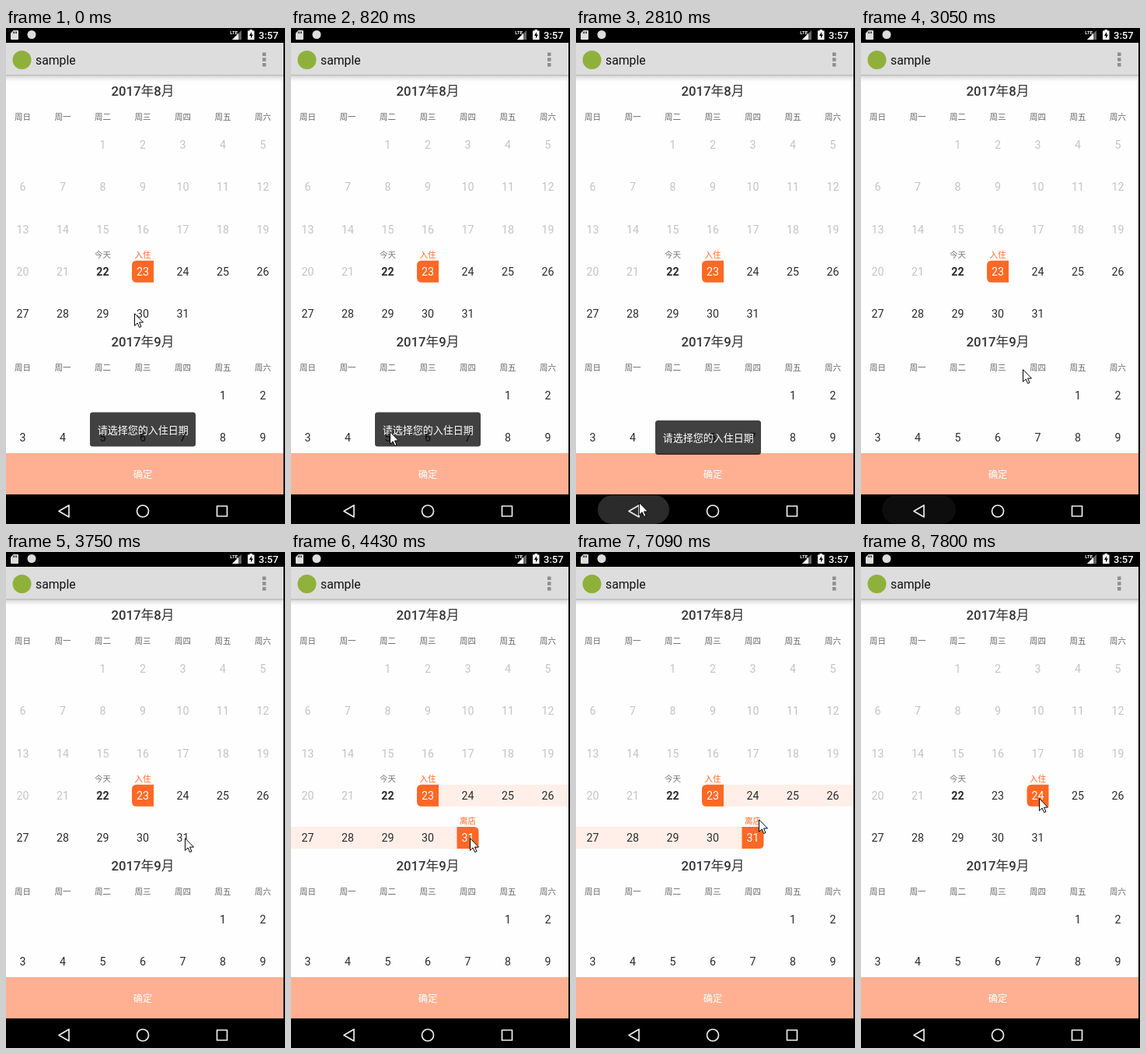
Write an HTML page that moves like this. It is 359 by 637 pixels and loops after 8000 ms.

```html
<!DOCTYPE html>
<html lang="zh-CN">
<head>
<meta charset="utf-8">
<title>sample</title>
<style>
  html, body { margin: 0; width: 100%; height: 100%; overflow: hidden; background: #000; }
  svg { display: block; width: 359px; height: 637px; }
  text { font-family: Roboto, "Noto Sans CJK SC", "Noto Sans CJK", sans-serif; }
</style>
</head>
<body>
<svg id="stage" viewBox="0 0 359 637" xmlns="http://www.w3.org/2000/svg">
  <defs>
    <linearGradient id="shade" x1="0" y1="0" x2="0" y2="1">
      <stop offset="0" stop-color="#b4b4b4"/>
      <stop offset=".3" stop-color="#e2e2e2"/>
      <stop offset="1" stop-color="#fff"/>
    </linearGradient>
  </defs>
  <rect width="359" height="637"/>
  <rect y="19" width="357" height="580" fill="#fefefe"/>
  <g id="marks"></g>
  <g id="calendar"></g>

  <!-- action bar -->
  <rect y="60" width="357" height="9" fill="url(#shade)"/>
  <rect y="19" width="357" height="41" fill="#ddd"/>
  <circle cx="20.5" cy="41" r="12" fill="#8fb13c"/>
  <text x="38" y="47" font-size="15.8" fill="#111">sample</text>
  <path d="M330 31.5h4.5v4.5h-4.5zM330 38.3h4.5v4.5h-4.5zM330 45h4.5v4.5h-4.5z" fill="#8e8e8e"/>

  <!-- status bar -->
  <path d="M9.5 3H15a1 1 0 0 1 1 1v10a1 1 0 0 1-1 1H7a1 1 0 0 1-1-1V6.5z" fill="#ddd"/>
  <path d="M9.5 4.5v2.6M11.5 4.5v2.6M13.5 4.5v2.6" stroke="#000" stroke-width=".9"/>
  <circle cx="33" cy="8.5" r="5.5" fill="#ddd"/>
  <path d="M291 15L303 3V15z" fill="#666"/>
  <path d="M291 15L299 7V15z" fill="#fff"/>
  <text x="288.3" y="8" font-size="6" font-weight="700" fill="#fff">LTE</text>
  <path d="M313.5 2h3.5v1.5h2.5V15h-8.500V3.500h2.500z" fill="#fff"/>
  <path d="M316 5l-3 5h2v3.500l3-5h-2z" fill="#000"/>
  <text x="325" y="14" font-size="13" font-weight="500" fill="#fff">3:57</text>

  <!-- confirm button and navigation -->
  <rect y="546" width="357" height="53" fill="#ffb092"/>
  <text x="176" y="577.5" font-size="12.3" fill="#fff" text-anchor="middle">确定</text>
  <rect id="ripple" y="600" height="37" rx="18.500"/>
  <g fill="none" stroke="#eee" stroke-width="1.700" stroke-linejoin="round">
    <path d="M68 620.500L81 613V628z"/>
    <circle cx="176" cy="620.500" r="7.500"/>
    <rect x="271.500" y="614" width="13" height="13"/>
  </g>

  <g id="toast">
    <rect x="108" y="493.500" width="136" height="44" rx="3.500" fill="#000" fill-opacity=".74"/>
    <text x="176.300" y="520.500" font-size="13" fill="#fff" text-anchor="middle">请选择您的入住日期</text>
  </g>

  <g id="cursor">
    <path d="M.5.700V16.300L4.100 12.900 6.600 18.500 9 17.500 6.500 12H11.500z" fill="#fff" stroke="#000" stroke-width="1"/>
    <circle id="busy" cx="16" cy="0" r="5.500" fill="none" stroke="#45b4dc" stroke-width="3"/>
  </g>
</svg>
<script>
const NS = "http://www.w3.org/2000/svg";
const $ = id => document.getElementById(id);
const LOOP = 8000, ORANGE = "#ff6825", DARK = "#2b2b2b";

function add(parent, tag, attrs, content) {
  const el = document.createElementNS(NS, tag);
  for (const key in attrs) el.setAttribute(key, attrs[key]);
  if (content !== undefined) el.textContent = content;
  return parent.appendChild(el);
}

const label = (parent, x, y, size, fill, content, weight = 400) =>
  add(parent, "text", { x, y, "font-size": size, fill, "font-weight": weight, "text-anchor": "middle" }, content);

const colX = col => 21.5 + 51.5 * col;
const rowY = (top, row) => top + 54.25 * row;
const AUGUST = 150, SEPTEMBER = 472;
const augustCell = day => {
  const i = day + 1;
  return { col: i % 7, x: colX(i % 7), y: rowY(AUGUST, Math.floor(i / 7)) };
};

const days = [];

function buildMonth(month, top, first, count) {
  const g = $("calendar");
  label(g, 176, top - 63, 16.7, "#333", `2017年${month}月`, 500);
  [..."日一二三四五六"].forEach((d, i) => label(g, colX(i), top - 32, 10.5, "#666", "周" + d, 500));
  for (let day = 1; day <= count; day++) {
    const i = first + day - 1, past = month === 8 && day < 22, today = month === 8 && day === 22;
    const el = label(g, colX(i % 7), rowY(top, Math.floor(i / 7)) + 5.1, 14.2,
      past ? "#c4c4c4" : DARK, day, today ? 700 : 400);
    if (month === 8) days[day] = el;
  }
}

buildMonth(8, AUGUST, 2, 31);
buildMonth(9, SEPTEMBER, 5, 9);
label($("calendar"), colX(2), 295, 10.5, "#777", "今天");

// A day tile with two rounded corners on its outer side
function tile(g, day, name, side) {
  const { x, y } = augustCell(day), r = 6;
  add(g, "path", {
    d: `M14-14H${r - 14}Q-14-14-14 ${r - 14}V${14 - r}Q-14 14 ${r - 14} 14H14z`,
    transform: `translate(${x} ${y}) scale(${side} 1)`, fill: ORANGE
  });
  label(g, x, y - 18, 10.5, ORANGE, name);
  days[day].setAttribute("fill", "#fff");
}

let shown = "";
function select(start, end) {
  const key = start + "-" + end;
  if (key === shown) return;
  shown = key;
  const g = $("marks");
  g.replaceChildren();
  for (let day = 23; day <= 31; day++) days[day].setAttribute("fill", DARK);
  for (let day = start; day <= end; day++) {
    const { col, x, y } = augustCell(day);
    const left = day === start ? x : col === 0 ? 0 : x - 26;
    const right = day === end ? x : col === 6 ? 357 : x + 26;
    add(g, "rect", { x: left, y: y - 14, width: right - left, height: 28, fill: "#ffefe8" });
  }
  tile(g, start, "入住", 1);
  if (end) tile(g, end, "离店", -1);
}

// time, x, y of each pointer position
const POINTER = [
  [0, 165, 366], [250, 171, 368], [400, 191, 359], [550, 184, 410], [670, 159, 473],
  [820, 127, 518], [970, 96, 593], [1120, 82, 608], [1240, 77, 611], [1550, 150, 528],
  [1670, 209, 440], [1820, 225, 408], [1950, 223, 410], [2100, 142, 536], [2250, 90, 596],
  [2380, 71, 613], [2530, 77, 616], [2810, 81, 609], [2930, 146, 540], [3050, 208, 438],
  [3200, 222, 390], [3320, 227, 371], [3600, 229, 368], [3750, 230, 367], [5760, 231, 367],
  [7090, 235, 343], [7220, 235, 331], [7370, 230, 320], [7520, 229, 316]
];

// time, toast opacity, toast dx, toast dy, ripple colour, ripple left, ripple width
const FEEDBACK = [
  [0, 1, 0, 0, "#000", 28, 92],
  [2810, 1, -6, 10.5, "#2b2b2b", 28, 92],
  [2930, .4, -6, 10.5, "#1b1b1b", 27, 94],
  [3050, 0, 0, 0, "#0d0d0d", 27, 95],
  [3200, 0, 0, 0, "#000", 27, 95]
];

const at = (steps, t) => steps.findLast(step => step[0] <= t);

function render(t) {
  const [, x, y] = at(POINTER, t);
  $("cursor").setAttribute("transform", `translate(${x} ${y})`);
  $("busy").setAttribute("visibility", t >= 5240 && t < 5360 ? "visible" : "hidden");

  const [, opacity, dx, dy, fill, left, width] = at(FEEDBACK, t);
  $("toast").setAttribute("opacity", opacity);
  $("toast").setAttribute("transform", `translate(${dx} ${dy})`);
  $("ripple").setAttribute("fill", fill);
  $("ripple").setAttribute("x", left);
  $("ripple").setAttribute("width", width);

  if (t < 4430) select(23, 0);
  else if (t < 7800) select(23, 31);
  else select(24, 0);
}

const began = performance.now();
function tick() {
  render((performance.now() - began) % LOOP);
  requestAnimationFrame(tick);
}
tick();
</script>
</body>
</html>
```
